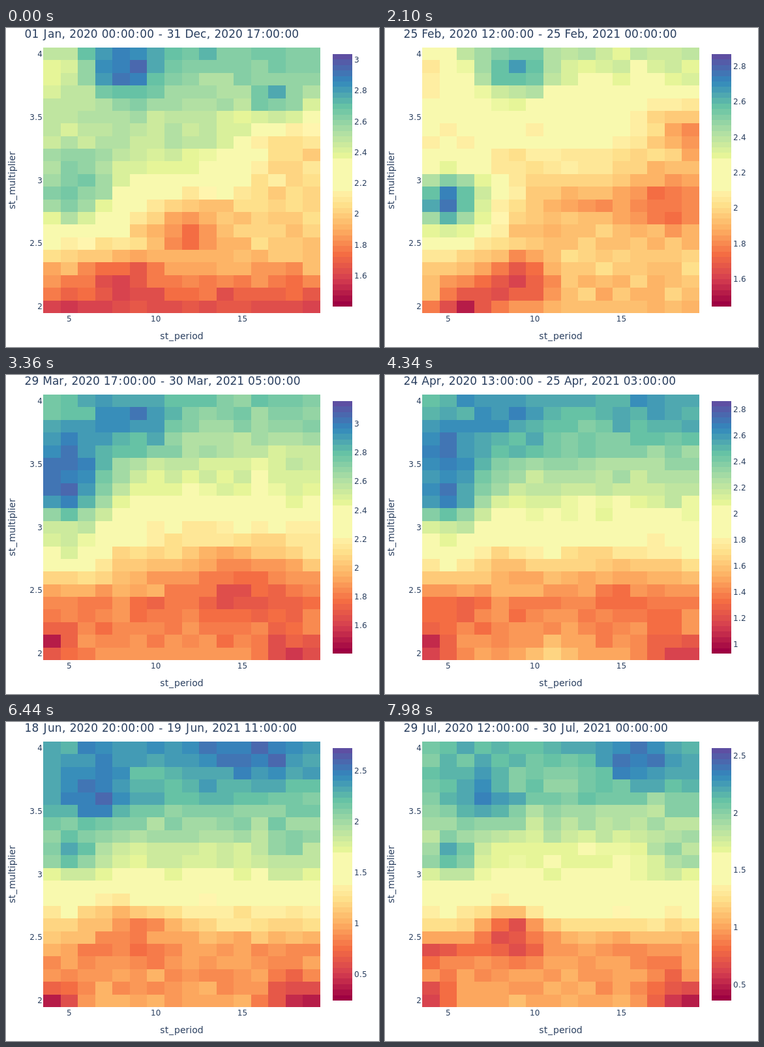
An HTML page for the animation above (8 s loop, 572x489 px).

```html
<!DOCTYPE html>
<html lang="en">
<head>
<meta charset="utf-8">
<style>
  html, body { margin: 0; width: 100%; height: 100%; overflow: hidden; background: #fff; }
  svg { display: block; }
  text { font-family: "DejaVu Sans", Verdana, sans-serif; font-size: 12px; fill: #2a3f5f; }
  #title { font-size: 17px; white-space: pre; }
  .axis { font-size: 14px; text-anchor: middle; }
  .mid { text-anchor: middle; }
  .end { text-anchor: end; }
</style>
</head>
<body>
<svg id="stage" width="572" height="489" viewBox="0 0 572 489">
  <g id="cells" shape-rendering="crispEdges"></g>
  <g id="bar" shape-rendering="crispEdges"></g>
  <g id="axes"></g>
  <g id="ticks"></g>
</svg>
<script>
const COLS = 16, ROWS = 21, STEP = 140, LOOP = 8000;
const PLOT = { x: 57, y: 30, w: 425, h: 407 };
const BAR = { x: 501, y: 40, w: 30, h: 387, bands: 46 };
const $ = id => document.getElementById(id);
const mix = (a, b, k) => a + (b - a) * k;

function add(parent, tag, attrs) {
  const el = document.createElementNS("http://www.w3.org/2000/svg", tag);
  for (const name in attrs) el.setAttribute(name, attrs[name]);
  return parent.appendChild(el);
}

// Punctuation gets a little air on both sides, in em
const AIR = { ":": 0.058, ",": 0.023, ".": 0.023, " ": 0.017, "-": 0.047, "_": 0.068, J: 0.08 };
function write(el, text) {
  const chars = [...String(text)], air = c => AIR[c] || 0;
  el.textContent = text;
  el.setAttribute("dx", chars.map((c, i) => (air(c) + air(chars[i - 1])).toFixed(3) + "em").join(" "));
}
const label = (parent, attrs, text) => write(add(parent, "text", attrs), text);

// Diverging colour scale, v from 0 to 1, in discrete shades with a flat middle
const SCALE = ["9e0142", "d53e4f", "f46d43", "fdae61", "fee08b", "ffffbf",
  "e6f598", "abdda4", "66c2a5", "3288bd", "5e4fa2"]
  .map(h => [0, 2, 4].map(i => parseInt(h.slice(i, i + 2), 16)));

function shade(v) {
  if (v > 0.457 && v < 0.58) return "#f8f9ae";
  const p = Math.round(Math.min(1, Math.max(0, v)) * 45) / 4.5;
  const i = Math.min(9, Math.floor(p));
  return `rgb(${SCALE[i].map((c, n) => Math.round(mix(c, SCALE[i + 1][n], p - i)))})`;
}

function random(seed) {
  return () => {
    seed = (seed + 0x6D2B79F5) | 0;
    let t = Math.imul(seed ^ (seed >>> 15), 1 | seed);
    t = (t + Math.imul(t ^ (t >>> 7), 61 | t)) ^ t;
    return ((t ^ (t >>> 14)) >>> 0) / 4294967296;
  };
}

const rough = random(7);
const grain = Array.from({ length: COLS * ROWS }, () => (rough() - 0.5) * 6);

// A value for every fourth row from the top, plus round hills: [column, row, radius, height]
function field(profile, hills, seed) {
  const rnd = random(seed);
  return grain.map((g, n) => {
    const c = n % COLS, r = Math.floor(n / COLS), j = Math.min(4, r >> 2);
    let v = mix(profile[j], profile[j + 1], r / 4 - j) + g + (rnd() - 0.5) * 4;
    for (const [x, y, size, height] of hills)
      v += height * Math.exp(-((c - x) ** 2 + (r - y) ** 2) / size ** 2);
    return v;
  });
}

const scenes = [];
// step: position in the loop; from, to: hours since 1 Jan 2020; lo, hi: value range
function scene(step, from, to, lo, hi, profile, hills) {
  scenes.push({ step, from, to, lo, hi, cells: field(profile, hills, step + 1) });
}

scene(0, 0, 8777, 1.401, 3.038, [78, 67, 64, 40, 35, 13],
  [[4.5, 1.5, 2, 22], [0, 1.5, 2, -16], [13, 4, 1.5, 20], [14, 7.5, 3, -28],
   [1, 11.5, 3, 34], [8, 14, 2, -16], [4, 17.5, 1.6, -15]]);

scene(8, 707, 9484, 0.853, 2.39, [76, 62, 54, 49, 36, 32],
  [[5, 1.5, 2, 25], [14, 4, 2, 14], [0, 8, 2, 28], [0, 12, 2, 36],
   [4.5, 18, 2.5, -17], [2, 20, 2, -22], [8, 15, 2, -12]]);

scene(15, 1332, 10104, 1.445, 2.87, [65, 52, 43, 31, 37, 32],
  [[5, 1.5, 2, 26], [0, 1.5, 2, -18], [15, 6, 2, -24], [1, 11.8, 2.6, 60],
   [14, 11.5, 3, -12], [5, 18, 2, -22], [2, 20, 1.6, -24]]);

scene(24, 2129, 10901, 1.405, 3.16, [78, 66, 55, 39, 23, 25],
  [[5, 2, 2.5, 17], [1, 4, 2.5, 20], [0.7, 7.5, 2.5, 36], [1, 12, 2, 22],
   [11, 14, 3, -13], [0, 19, 1, -22], [14, 20, 1.4, -17]]);

scene(38, 3369, 12144, 0.451, 2.566, [88, 80, 67, 49, 26, 28],
  [[13, 1.5, 3, 9], [1, 4, 2, 13], [1, 8, 1.7, 27], [4, 13, 1.7, -14],
   [1, 16, 1.7, -16], [0, 19.5, 1.2, -24], [7, 20, 1.4, 18], [14.5, 20, 1.3, -20]]);

scene(46, 4076, 12851, 0.244, 2.724, [87, 78, 65, 49, 27, 28],
  [[11, 0.5, 3, 9], [2.5, 4, 2.2, 17], [1, 8.5, 1.7, 20], [4.5, 14, 2, -15],
   [14, 8.5, 2, 8], [0, 20, 1.3, -23], [14.5, 20, 1.8, -22]]);

scene(57, 5052, 13824, 0.363, 2.568, [81, 74, 60, 52, 27, 29],
  [[12, 1, 2.5, 14], [3, 4, 2, 16], [1, 8.5, 1.6, 25], [14.5, 8.5, 1.8, 12],
   [4.5, 14.5, 1.8, -26], [0.5, 16, 1.2, -16], [0, 19.5, 1.1, -20], [14.5, 20, 1.6, -24]]);

// Static parts
const title = add($("stage"), "text", { id: "title", x: 28.6, y: 15 });
label($("stage"), { class: "axis", x: 269.5, y: 477 }, "st_period");
label($("stage"), { class: "axis", transform: "translate(14 233.5) rotate(-90)" }, "st_multiplier");

const edgeX = c => Math.round(PLOT.x + c * PLOT.w / COLS);
const edgeY = r => Math.round(PLOT.y + r * PLOT.h / ROWS);
const rects = grain.map((_, n) => {
  const c = n % COLS, r = Math.floor(n / COLS), x = edgeX(c), y = edgeY(r);
  return add($("cells"), "rect", { x, y, width: edgeX(c + 1) - x, height: edgeY(r + 1) - y });
});
for (let b = 0; b < BAR.bands; b++) {
  const edge = n => Math.round(BAR.y + n * BAR.h / BAR.bands);
  add($("bar"), "rect", { x: BAR.x, y: edge(b), width: BAR.w, height: edge(b + 1) - edge(b),
    fill: shade(1 - (b + 0.5) / BAR.bands) });
}
for (let p = 5; p <= 15; p += 5)
  label($("axes"), { class: "mid", x: PLOT.x + (p - 3.5) * PLOT.w / COLS, y: 450 }, p);
for (let m = 2; m <= 4; m += 0.5)
  label($("axes"), { class: "end", x: 56, y: PLOT.y + (40.5 - m * 10) * PLOT.h / ROWS + 4 }, m);

const MONTHS = "Jan Feb Mar Apr May Jun Jul Aug Sep Oct Nov Dec".split(" ");
function stamp(hours) {
  const d = new Date(Date.UTC(2020, 0, 1, Math.round(hours)));
  const two = n => String(n).padStart(2, "0");
  return `${two(d.getUTCDate())} ${MONTHS[d.getUTCMonth()]}, ${d.getUTCFullYear()} ${two(d.getUTCHours())}:00:00`;
}

function drawTicks(lo, hi) {
  $("ticks").textContent = "";
  const gap = hi - lo > 1.95 ? 0.5 : 0.2;
  for (let n = Math.ceil(lo / gap); n * gap <= hi; n++) {
    const y = BAR.y + BAR.h * (hi - n * gap) / (hi - lo);
    label($("ticks"), { x: 534, y: y + 4 }, +(n * gap).toFixed(1));
  }
}

function draw(step) {
  let i = 0;
  while (i < scenes.length - 2 && step >= scenes[i + 1].step) i++;
  const a = scenes[i], b = scenes[i + 1], k = (step - a.step) / (b.step - a.step);
  const now = key => mix(a[key], b[key], k);
  write(title, `${stamp(now("from"))} - ${stamp(now("to"))}`);
  drawTicks(now("lo"), now("hi"));
  rects.forEach((el, n) => el.setAttribute("fill", shade(mix(a.cells[n], b.cells[n], k) / 100)));
}

let shown = -1;
function tick() {
  const step = Math.floor(performance.now() % LOOP / STEP);
  if (step !== shown) draw(shown = step);
  requestAnimationFrame(tick);
}
tick();
</script>
</body>
</html>
```
